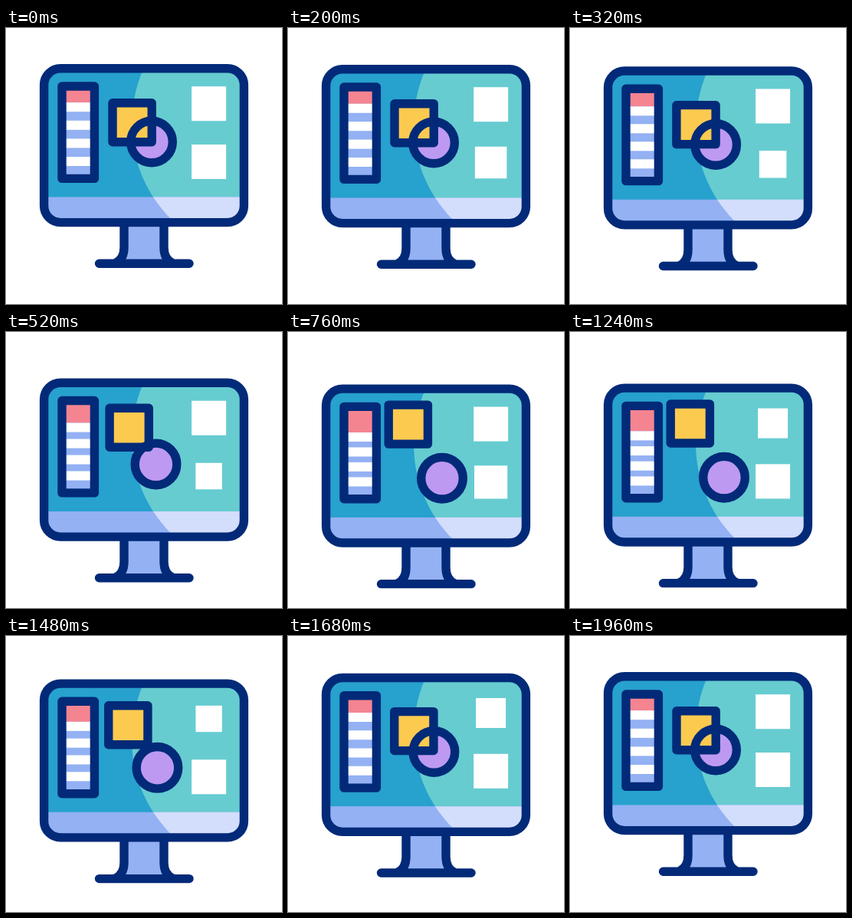
Write an HTML page that moves like this. It is 360x360 px and loops after 2000 ms.

```html
<!DOCTYPE html>
<html lang="en">
<head>
<meta charset="utf-8">
<title>Design monitor</title>
<style>
  html, body { margin: 0; width: 100%; height: 100%; overflow: hidden; background: #fff; }
  svg { display: block; width: 100%; height: 100%; }
  .line { fill: none; stroke: #022a78; stroke-width: 11.4; stroke-linecap: round; stroke-linejoin: round; }
</style>
</head>
<body>
<svg viewBox="0 0 360 360">
  <defs>
    <clipPath id="screen"><rect x="50" y="53" width="260" height="200" rx="21"/></clipPath>
    <path id="glare" d="M178 56 C155 110 156 190 216 250 H320 V56 Z"/>
    <clipPath id="lit"><use href="#glare"/></clipPath>
  </defs>
  <g id="monitor">
    <path fill="#93b1f3" d="M154 254 V286 Q154 302 145 307 H215 Q206 302 206 286 V254 Z"/>
    <path class="line" d="M154 256 V286 Q154 302 142 307 M206 256 V286 Q206 302 218 307 M121.5 307.3 H239"/>
    <g clip-path="url(#screen)">
      <rect x="44" y="47" width="272" height="174" fill="#27a1cd"/>
      <use href="#glare" fill="#66ccd0"/>
      <rect x="44" y="220.5" width="272" height="40" fill="#93b1f3"/>
      <rect x="44" y="220.5" width="272" height="40" fill="#d3ddfc" clip-path="url(#lit)"/>
    </g>
    <rect class="line" x="49.6" y="52.8" width="260.8" height="200.8" rx="21.5"/>

    <rect x="73" y="76" width="42.5" height="120.5" fill="#93b1f3"/>
    <rect id="pink" x="73" y="78" width="42.5" fill="#f58491"/>
    <g id="rows" fill="#fff"></g>
    <rect class="line" x="73" y="76" width="42.4" height="120.4"/>

    <rect class="tile" fill="#fff"/>
    <rect class="tile" fill="#fff"/>

    <circle class="disc" cx="190" cy="148.5" r="27.3" fill="#bd99f2"/>
    <rect class="box" x="139" y="97.7" width="51.2" height="51" fill="#fdca50"/>
    <circle class="disc line" cx="190" cy="148.5" r="27.3"/>
    <rect class="box line" x="139" y="97.7" width="51.2" height="51"/>
  </g>
</svg>
<script>
const LOOP = 2000, STEP = 40;
const all = s => [...document.querySelectorAll(s)];
const monitor = document.getElementById('monitor');
const pink = document.getElementById('pink');
const rowGroup = document.getElementById('rows');
const tiles = all('.tile'), discs = all('.disc'), boxes = all('.box');

const rows = [0, 1, 2, 3].map(() => {
  const r = document.createElementNS('http://www.w3.org/2000/svg', 'rect');
  for (const [k, v] of Object.entries({ x: 73, width: 42.5, height: 12 })) r.setAttribute(k, v);
  return rowGroup.appendChild(r);
});

// Symmetric cubic-bezier(.65, 0, .35, 1), solved by bisection.
function ease(x) {
  if (x <= 0) return 0;
  if (x >= 1) return 1;
  let lo = 0, hi = 1, s;
  for (let i = 0; i < 24; i++) {
    s = (lo + hi) / 2;
    const u = 1 - s;
    if (1.95 * s * u * u + 1.05 * s * s * u + s * s * s < x) lo = s; else hi = s;
  }
  return s * s * (3 - 2 * s);
}

// Rises 0 to 1 over a..b and falls back over c..d.
const pulse = (t, a, b, c, d) => ease((t - a) / (b - a)) - ease((t - c) / (d - c));

const shift = (els, x, y) => els.forEach(e => e.setAttribute('transform', `translate(${x} ${y})`));

function setTile(tile, cy, shrink) {
  const size = 45 - 10.7 * shrink;
  tile.setAttribute('x', 264.6 - size / 2);
  tile.setAttribute('y', cy - size / 2);
  tile.setAttribute('width', size);
  tile.setAttribute('height', size);
}

function draw(t) {
  const sink = pulse(t, 0, 970, 970, 1930);
  const split = pulse(t, 260, 780, 1250, 1780);
  shift([monitor], 0, 22.5 * sink);

  const gap = 23.6 - 4.35 * sink;
  rows.forEach((r, i) => r.setAttribute('y', 168 - gap * i));
  pink.setAttribute('height', 90 - gap * 3);

  shift(boxes, -7.8 * split, -24 * split);
  shift(discs, 11 * split, 20.8 * split);

  setTile(tiles[0], 98.7, pulse(t, 1000, 1460, 1460, 1920));
  setTile(tiles[1], 174.5, pulse(t, 0, 460, 460, 920));
}

function tick() {
  const t = Math.floor((performance.now() % LOOP) / STEP) * STEP;
  draw(t < 2 * STEP ? 0 : t);
  requestAnimationFrame(tick);
}
tick();
</script>
</body>
</html>
```
